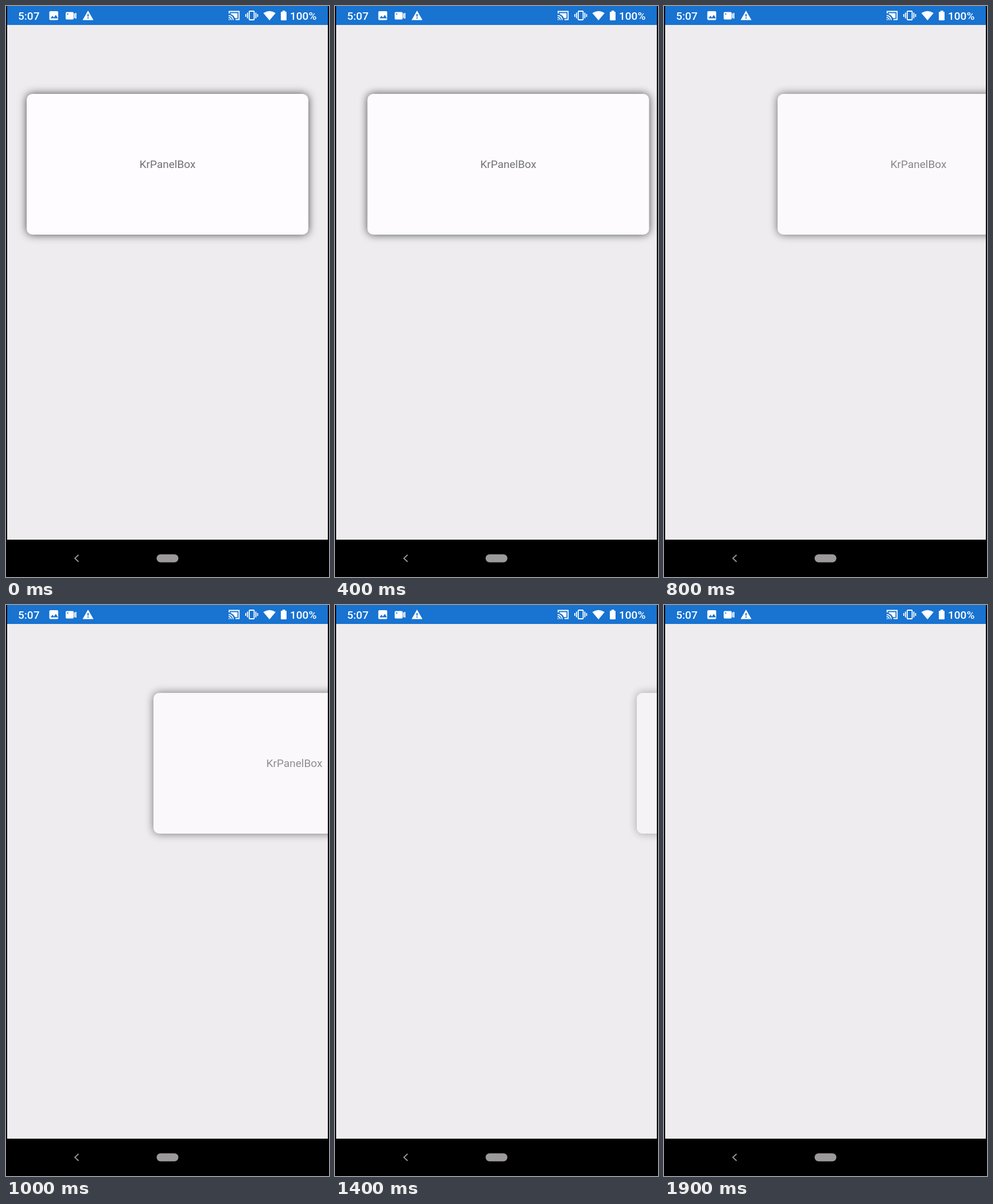
Recreate the animation shown at these times as an HTML page. Size 563x994 px, loop 2.1 s.

```html
<!DOCTYPE html>
<html lang="en">
<head>
<meta charset="utf-8">
<title>Card swipe</title>
<style>
  html, body { margin: 0; width: 100%; height: 100%; overflow: hidden; background: #000; }
  svg { position: absolute; left: 0; top: 0; }
  text { font: 500 19px Roboto, sans-serif; }
  #page { position: absolute; left: 2px; top: 33px; width: 559px; height: 896px; overflow: hidden; background: #eeecef; }
  #card {
    position: absolute; left: 0; top: 120px; width: 491px; height: 245px;
    border-radius: 10px; background: #fefcff; box-shadow: 0 0 15px rgba(0, 0, 0, .7);
    font: 19px/245px Roboto, sans-serif; color: #717073; text-align: center;
  }
</style>
</head>
<body>
<svg width="563" height="994" viewBox="0 0 563 994">
  <path fill="#1873d1" d="M2 0h559v33H2z"/>
  <g fill="#fff">
    <text x="21" y="24">5:07</text>
    <text x="495" y="24">100%</text>
    <!-- picture, camera, warning -->
    <rect x="75.5" y="9" width="15.5" height="15.5" rx="2"/>
    <path fill="#1873d1" d="M77.5 21.5l3.5-4.5 2.5 3 3.3-4.5 4 6z"/>
    <rect x="104" y="10.5" width="14" height="13" rx="2"/>
    <path d="M118.8 13.5l2-1.5v10l-2-1.5zM121.4 12h1.4v10h-1.4z"/>
    <path fill="#1873d1" d="M106.5 13h2v2h-2z"/>
    <path d="M143 8l9.5 16.5h-19z"/>
    <path fill="#1873d1" d="M142 14h2v4.5h-2zM142 20h2v2h-2z"/>
    <!-- wifi, battery -->
    <path d="M448.5 12.3Q459.3 5 470 12.3L459.3 25z"/>
    <path d="M482 8h4.5v2h1.5q1 0 1 1v13q0 1-1 1h-7.500q-1.500 0-1.500-1V11q0-1 1-1h2z"/>
  </g>
  <!-- cast, vibrate -->
  <g fill="none" stroke="#fff" stroke-width="1.8">
    <path d="M389 13V9.500H406.300V23.500H400M388 16.500a8 8 0 0 1 8 8M388 20a4.500 4.500 0 0 1 4.500 4.500"/>
    <path fill="#fff" stroke="none" d="M391.500 12.500h12v8.500h-4.500q-2-5-7.500-7zM388 22.500a2 2 0 0 1 2 2h-2z"/>
    <rect x="424" y="9" width="8.500" height="15" rx="1"/>
    <path d="M421 11.500v10M418 14v5M435.500 11.500v10M438.500 14v5"/>
  </g>
  <path d="M126.500 955.500L120 961.500l6.500 6" fill="none" stroke="#999" stroke-width="1.800"/>
  <rect x="262.500" y="954.500" width="38" height="14" rx="7" fill="#9b999a"/>
</svg>
<div id="page"><div id="card">KrPanelBox</div></div>
<script>
  const card = document.getElementById('card');
  const LOOP = 2100, STEP = 100, HOME = 36;
  // Left edge of the card at each step: drag, then fling off screen.
  const path = [36, 36, 36, 41, 56.5, 97, 136, 169, 198, 227, 257, 298, 362, 442, 526];

  function draw(now) {
    const x = path[Math.floor(now % LOOP / STEP)];
    card.style.visibility = x === undefined ? 'hidden' : 'visible';
    if (x !== undefined) {
      card.style.transform = `translateX(${x - 2}px)`;
      card.style.opacity = 1 - (x - HOME) / 900;
    }
  }

  const start = performance.now();
  function tick() {
    draw(performance.now() - start);
    requestAnimationFrame(tick);
  }
  tick();
</script>
</body>
</html>
```
